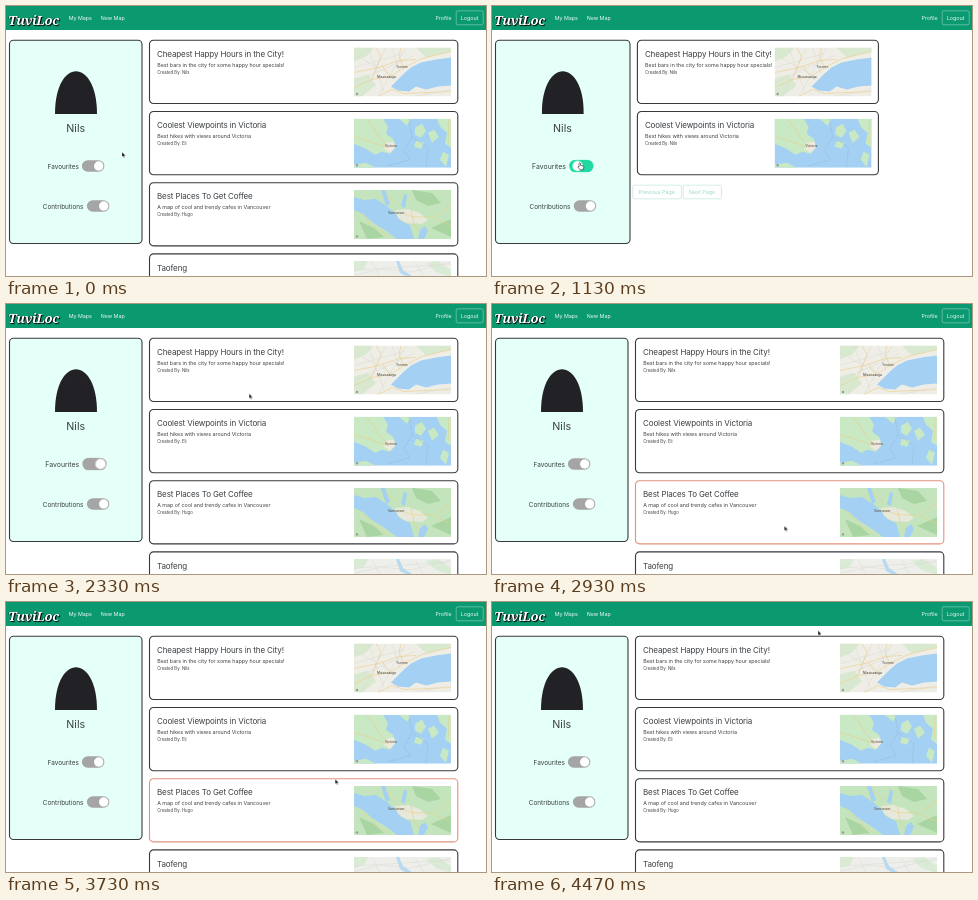
These frames come from a looping animation (480 by 270 pixels, 4.54 s). An HTML page:

```html
<!DOCTYPE html>
<html lang="en">
<head>
<meta charset="utf-8">
<title>Map profile</title>
<style>
  html, body { margin: 0; width: 100%; height: 100%; overflow: hidden; background: #fff; }
  #stage { display: block; width: 100vw; height: 100vh; font-family: Inter, sans-serif; font-size: 5.33px; fill: #3a3f43; }
  #stage * { animation-duration: 4540ms; animation-iteration-count: infinite; animation-timing-function: linear; }

  .nav text { fill: #eef9f5; }
  .nav .brand { font: italic 600 13px "Noto Serif", serif; letter-spacing: -.3px; fill: #fff; text-shadow: 1px 1px 1px #000, -.4px .6px 0 #111; }
  .title { font-size: 8px; letter-spacing: -.12px; }
  .by { font-size: 4.25px; }
  .name { font-size: 10.67px; text-anchor: middle; }
  .label { font-size: 6.4px; }
  .frame { fill: #fff; stroke: #37393c; stroke-width: 1.1; }
  .track { fill: #a5a5a5; }
  .knob { fill: #fff; }
  .pager rect { fill: #fff; stroke: #c3e5df; stroke-width: .7; }
  .pager text { fill: #9ad5cb; }
  .road { fill: none; stroke: #edcd85; stroke-width: .6; }
  .minor { fill: none; stroke: #d9d8d2; stroke-width: .5; }
  .place { font-size: 3.2px; font-weight: 500; fill: #555; }

  .all { animation-name: all; }
  .liked { animation-name: liked; }
  #stage .all, #stage .liked, #stage .side, #stage .panel, #stage .hand { animation-timing-function: step-end; }
  .side { animation-name: shift; }
  .panel { fill: #e5fff9; animation-name: widen; }
  .fav { transform-origin: 70px 160px; animation-name: grow; }
  .fav .track { animation-name: tint; }
  .fav .knob { animation-name: slide; }
  .arrow { animation-name: travel; }
  .hand { animation-name: hand; }
  .h1 { animation-name: hover1; }
  .h2 { animation-name: hover2; }
  .h3 { animation-name: hover3; }
  .h4 { animation-name: hover4; }

  @keyframes all { 0%, 44% { visibility: visible } 23.49% { visibility: hidden } }
  @keyframes liked { 0%, 44% { visibility: hidden } 23.49% { visibility: visible } }
  @keyframes shift { 0%, 44% { transform: none } 23.49% { transform: translateX(.8px) } }
  @keyframes widen { 0%, 44% { width: 132.5px } 23.49% { width: 134.5px } }
  @keyframes grow {
    0%, 17.5%, 57%, to { transform: none }
    20.4%, 52.8% { transform: scale(1.08) }
  }
  @keyframes tint {
    0%, 17.5%, 42.4%, to { fill: #a5a5a5 }
    20.4%, 41.1% { fill: #1fd8a3 }
  }
  @keyframes slide {
    0%, 17.5%, 45.5%, to { transform: none }
    20.4%, 42.5% { transform: translateX(-9px) }
  }
  @keyframes hand { 0%, 46.5% { visibility: hidden } 5.87% { visibility: visible } }
  @keyframes travel {
    0%, 1.46% { transform: translate(116px, 146px); opacity: 1 }
    1.47%, 5.86% { transform: translate(104px, 150px); opacity: 1 }
    5.87%, 46.49% { transform: translate(88px, 158px); opacity: 0 }
    46.5% { transform: translate(92px, 157px); opacity: 1 }
    51.3% { transform: translate(243px, 89.5px) }
    57.3% { transform: translate(258px, 93px) }
    61.7% { transform: translate(285px, 172px) }
    66% { transform: translate(296px, 247px) }
    67.4%, 74.7% { transform: translate(298px, 272px) }
    74.8%, 76% { transform: translate(299px, 268px) }
    79.3% { transform: translate(318px, 243px) }
    82.4% { transform: translate(330px, 172px) }
    85.2% { transform: translate(334px, 100px) }
    88.1% { transform: translate(329px, 50px) }
    89.6% { transform: translate(327px, 32px) }
    91%, to { transform: translate(326px, 28.5px); opacity: 1 }
  }
  @keyframes hover1 {
    0%, 51.5%, 61%, 85.2%, 92.5%, to { stroke: #37393c }
    54.4%, 58.1%, 86.6%, 91% { stroke: #e2917d }
  }
  @keyframes hover2 {
    0%, 58.1%, 64.5%, 82.4%, 88%, to { stroke: #37393c }
    60%, 61.7%, 84%, 85.2% { stroke: #e2917d }
  }
  @keyframes hover3 {
    0%, 61.7%, 69%, 79.3%, 85%, to { stroke: #37393c }
    63.5%, 66%, 81%, 82.4% { stroke: #e2917d }
  }
  @keyframes hover4 {
    0%, 76%, 82%, to { stroke: #37393c }
    77.6%, 79.3% { stroke: #e2917d }
  }
</style>
</head>
<body>
<svg id="stage" viewBox="0 0 480 270" preserveAspectRatio="none">
  <defs>
    <symbol id="lake" viewBox="0 0 97 49">
      <path fill="#eeede6" d="M0 0H97V49H0Z"/>
      <path fill="#d9e9d0" d="M0 0H20L12 9 0 14ZM0 31 14 27 22 38 8 49H0ZM62 0H97V4L72 10Z"/>
      <path fill="#a4d0f3" d="M97 10 82 12 67 15 57 20 50 26 44 32 37 39 44 43 55 44 62 39 72 42 84 39 97 38Z"/>
      <path class="minor" d="M0 20 50 6M8 49 32 0M0 7 42 30M24 49 52 0M60 49 97 42M0 35 60 8M14 0 30 44M38 0 46 25M70 44 76 49"/>
      <path class="road" d="M0 40 18 32 36 29 50 20 68 11 97 4M24 49 38 42 50 46 97 44M50 21 45 9 47 0M0 25 25 20 45 13 62 12M18 32 27 9 22 0M36 29 28 18"/>
      <text class="place" x="42" y="20">Toronto</text>
      <text class="place" x="23" y="30">Mississauga</text>
      <circle cx="3" cy="46.5" r="1.2" fill="#999"/>
    </symbol>

    <symbol id="islands" viewBox="0 0 97 49">
      <path fill="#a4d0f3" d="M0 0H97V49H0Z"/>
      <path fill="#c9e8c4" d="M0 0H29L34 8 32 15 39 20 42 28 36 35 28 33 21 36 12 30 0 25Z"/>
      <path fill="#c9e8c4" d="M45 0H57L53 7ZM61 9 68 5 72 12 67 19 61 16ZM74 14 80 11 85 18 78 24ZM62 22 70 24 67 30 60 28ZM83 0H97V29L91 25 93 14 86 8ZM89 33 95 36 92 48 86 41ZM0 46 12 44 22 49H0Z"/>
      <path fill="#eee9df" d="M32 24 40 23 41 29 36 34 30 30Z"/>
      <path class="road" d="M12 0 20 9 25 18 35 29M0 18 14 22 34 29M95 0 94 24"/>
      <path fill="none" stroke="#8fb0c6" stroke-width=".5" stroke-dasharray="2 1" d="M55 0 58 18 50 32 56 41 34 47M58 18 74 29 72 49"/>
      <text class="place" x="31" y="28">Victoria</text>
      <circle cx="3" cy="46.5" r="1.2" fill="#999"/>
    </symbol>

    <symbol id="strait" viewBox="0 0 97 49">
      <path fill="#c4e4bd" d="M0 0H97V49H0Z"/>
      <path fill="#a4d0f3" d="M0 7 10 10 22 9 34 17 41 23 47 31 56 35 60 49H43L31 40 18 32 9 24 0 20Z"/>
      <path fill="#a4d0f3" d="M27 0H31L36 14 32 16ZM47 16 50 4 53 5 51 18ZM64 49 66 40 71 36 74 41 70 49Z"/>
      <path fill="#e6e8da" d="M41 20 54 19 66 23 74 30 68 34 52 33 44 28Z"/>
      <path fill="#a8d5a2" d="M58 0 78 3 87 13 74 16 62 10ZM5 31 20 38 30 47 13 49ZM77 38 97 29V47Z"/>
      <path class="road" d="M44 22 59 27 78 27 97 36M57 19 60 35 66 43M6 23 20 37 34 47M97 15 82 26M43 14 32 5"/>
      <text class="place" x="34" y="24">Vancouver</text>
      <circle cx="3" cy="46.5" r="1.2" fill="#999"/>
    </symbol>

    <symbol id="plain" viewBox="0 0 97 49">
      <path fill="#eeeeeb" d="M0 0H97V49H0Z"/>
      <path fill="#d9ebd5" d="M0 0H14L10 8 0 11ZM72 2 84 0 97 9V16L82 11Z"/>
      <path fill="#b5daf2" d="M42 0H45L49 9 58 15 55 17 46 12Z"/>
      <path class="minor" d="M0 9 97 3M18 0 28 20M61 0 72 20M0 14 28 8 56 11 97 1"/>
    </symbol>
  </defs>

  <path fill="#fff" d="M0 0H480V270H0Z"/>

  <g class="nav">
    <path fill="#0b9a70" d="M0 0H480V24H0Z"/>
    <text class="brand" x="2" y="18.5">TuviLoc</text>
    <text x="62.7" y="14">My Maps</text>
    <text x="94.7" y="14">New Map</text>
    <text x="429.5" y="14">Profile</text>
    <rect x="450.2" y="4.8" width="27" height="14" rx="1.6" fill="none" stroke="#fff" stroke-opacity=".65" stroke-width=".5"/>
    <text x="454.8" y="14">Logout</text>
  </g>

  <rect class="frame panel" style="fill:#e5fff9" x="3.5" y="34.3" width="132.5" height="203.2" rx="4"/>
  <g class="side">
    <path fill="#222226" d="M49 108C49 51 91 51 91 108Z"/>
    <text class="name" x="69.7" y="126">Nils</text>
    <g class="fav">
      <text class="label" x="41.6" y="162.5">Favourites</text>
      <rect class="track" x="75.9" y="154.2" width="22.5" height="11.6" rx="5.8"/>
      <circle class="knob" cx="92.7" cy="160" r="4.7"/>
    </g>
    <text class="label" x="36.8" y="202.5">Contributions</text>
    <rect class="track" x="80.9" y="194.2" width="22.5" height="11.6" rx="5.8"/>
    <circle class="knob" cx="97.7" cy="200" r="4.7"/>
  </g>

  <g class="all">
    <g transform="translate(143.5 34.3)">
      <rect class="frame h1" width="308.3" height="63.2" rx="4"/>
      <text class="title" x="7.5" y="16.8">Cheapest Happy Hours in the City!</text>
      <text x="7.7" y="26.5">Best bars in the city for some happy hour specials!</text>
      <text class="by" x="7.7" y="33.3">Created By: Nils</text>
      <use href="#lake" x="204.5" y="7.2" width="97" height="49"/>
    </g>
    <g transform="translate(143.5 105.5)">
      <rect class="frame h2" width="308.3" height="63.2" rx="4"/>
      <text class="title" x="7.5" y="16.8">Coolest Viewpoints in Victoria</text>
      <text x="7.7" y="26.5">Best hikes with views around Victoria</text>
      <text class="by" x="7.7" y="33.3">Created By: Eli</text>
      <use href="#islands" x="204.5" y="7.2" width="97" height="49"/>
    </g>
    <g transform="translate(143.5 176.7)">
      <rect class="frame h3" width="308.3" height="63.2" rx="4"/>
      <text class="title" x="7.5" y="16.8">Best Places To Get Coffee</text>
      <text x="7.7" y="26.5">A map of cool and trendy cafes in Vancouver</text>
      <text class="by" x="7.7" y="33.3">Created By: Hugo</text>
      <use href="#strait" x="204.5" y="7.2" width="97" height="49"/>
    </g>
    <g transform="translate(143.5 247.9)">
      <rect class="frame h4" width="308.3" height="63.2" rx="4"/>
      <text class="title" x="7.5" y="16.8">Taofeng</text>
      <use href="#plain" x="204.5" y="7.2" width="97" height="49"/>
    </g>
  </g>

  <g class="liked">
    <g transform="translate(145.4 34.3)">
      <rect class="frame" width="241" height="63.2" rx="4"/>
      <text class="title" x="7.5" y="16.8">Cheapest Happy Hours in the City!</text>
      <text x="7.7" y="26.5">Best bars in the city for some happy hour specials!</text>
      <text class="by" x="7.7" y="33.3">Created By: Nils</text>
      <use href="#lake" x="137.2" y="7.2" width="97" height="49"/>
    </g>
    <g transform="translate(145.4 105.5)">
      <rect class="frame" width="241" height="63.2" rx="4"/>
      <text class="title" x="7.5" y="16.8">Coolest Viewpoints in Victoria</text>
      <text x="7.7" y="26.5">Best hikes with views around Victoria</text>
      <text class="by" x="7.7" y="33.3">Created By: Nils</text>
      <use href="#islands" x="137.2" y="7.2" width="97" height="49"/>
    </g>
    <g class="pager">
      <rect x="140.8" y="179.2" width="48.6" height="13.6" rx="1.4"/>
      <text x="146.8" y="188">Previous Page</text>
      <rect x="191.2" y="179.2" width="38.2" height="13.6" rx="1.4"/>
      <text x="197" y="188">Next Page</text>
    </g>
  </g>

  <path class="arrow" fill="#111" stroke="#fff" stroke-width=".4" d="M0 0V5L1.2 4 2 5.8 2.9 5.4 2.1 3.7H3.7Z"/>
  <path class="hand" fill="#fff" stroke="#222" stroke-width=".6" d="M87 157.4q.8-1 1.5 0v2l2.6.6q.8.2.7 1.2l-.5 2.6h-3.2l-2.2-2.6q.2-1.2 1.1-.3Z"/>
</svg>
</body>
</html>
```
